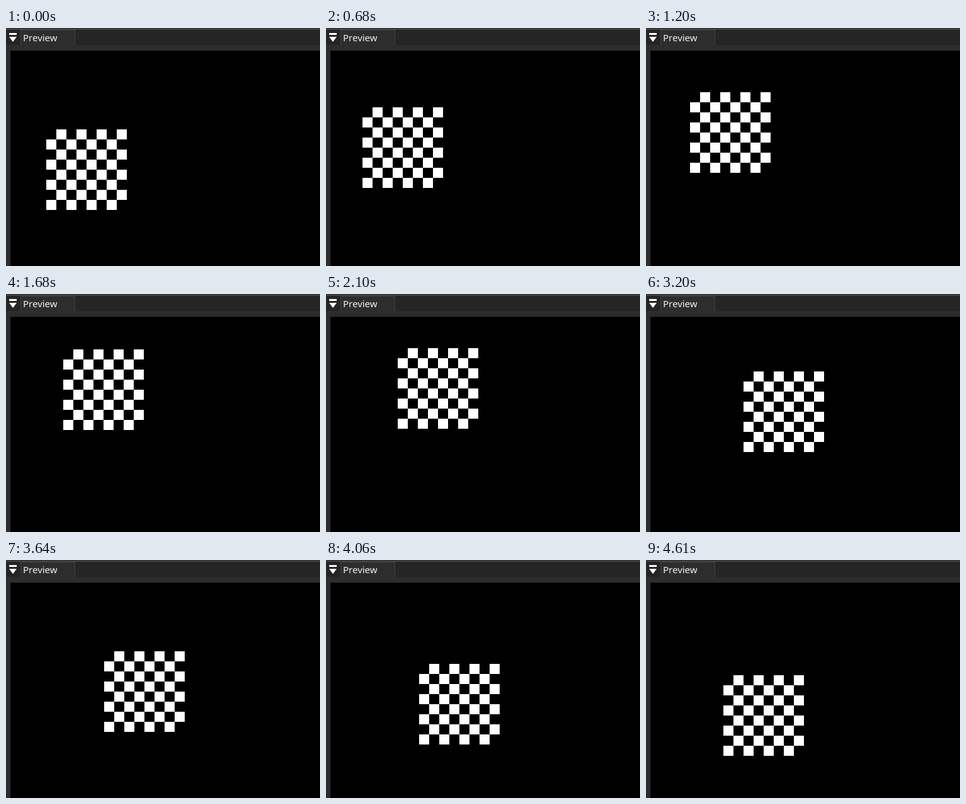
Write an HTML page that moves like this. It is 499x378 px and loops after 4.71 s.

```html
<!DOCTYPE html>
<html lang="en">
<head>
<meta charset="utf-8">
<title>Preview</title>
<style>
  html, body { margin: 0; width: 100%; height: 100%; overflow: hidden; background: #2d2d2d; }
  svg { display: block; }
  text { font: 15px "Noto Sans", sans-serif; fill: #f0f0f0; }
</style>
</head>
<body>
<svg width="499" height="378" shape-rendering="crispEdges">
  <defs>
    <pattern id="checks" width="32" height="32" patternUnits="userSpaceOnUse">
      <path d="M16 0h16v16h-16zM0 16h16v16h-16z" fill="#fff"/>
    </pattern>
  </defs>
  <rect width="499" height="378" fill="#2d2d2d"/>
  <rect y="1" width="499" height="2" fill="#414141"/>
  <rect y="3" width="499" height="24" fill="#252525"/>
  <path d="M23.5 27V3.5H109.5V27" fill="#2d2d2d" stroke="#414141"/>
  <path d="M5 8h12v3H5zM5 14h12l-6 8z" fill="#fff" shape-rendering="auto"/>
  <text x="27" y="21">Preview</text>
  <rect x="7" y="36" width="492" height="342"/>
  <rect id="board" width="128" height="128" fill="url(#checks)"/>
</svg>
<script>
const LOOP = 4710, STEP_TIME = 52.3, LEAD = 5, LAST_STEP = 88;
const START_ANGLE = 149.5, STEP_ANGLE = 3.2; // degrees
const RADIUS = 50, CENTER_X = 107, CENTER_Y = 136;
const board = document.getElementById("board");

// The board orbits clockwise in even steps and rests on the last one.
function draw() {
  const time = performance.now() % LOOP;
  const step = Math.min(LAST_STEP, Math.floor((time + LEAD) / STEP_TIME));
  const angle = (START_ANGLE + STEP_ANGLE * step) * Math.PI / 180;
  const x = Math.round(CENTER_X + RADIUS * Math.cos(angle));
  const y = Math.round(CENTER_Y + RADIUS * Math.sin(angle));
  board.setAttribute("transform", `translate(${x} ${y})`);
  requestAnimationFrame(draw);
}
draw();
</script>
</body>
</html>
```
